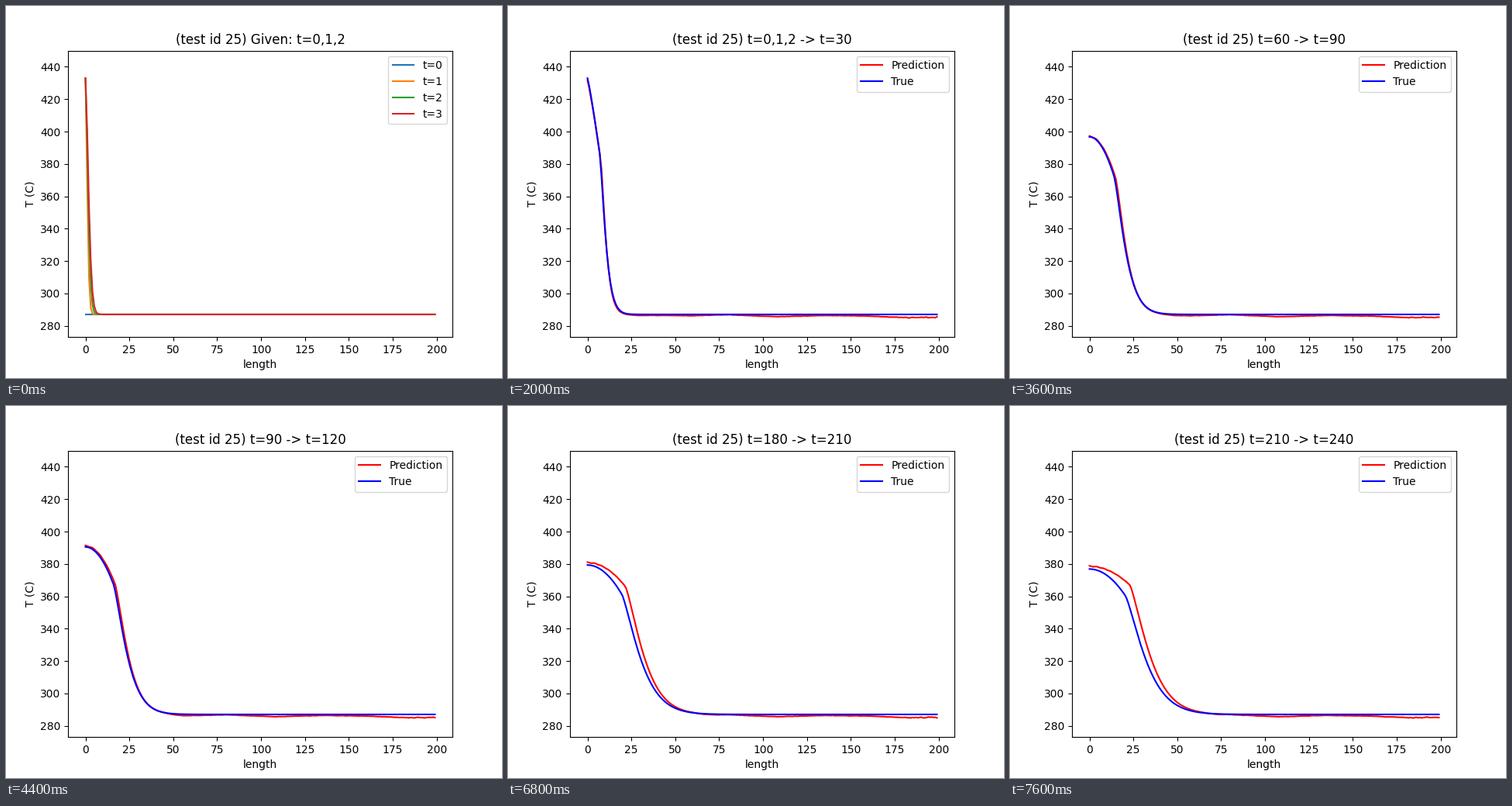
Recreate the animation shown at these times as a matplotlib script. Size 640 px wide and 480 px high, loop 8.4 s.

```python
import numpy as np
import matplotlib.pyplot as plt
from matplotlib.animation import FuncAnimation

AMBIENT = 287
HOT = 433             # surface temperature while the end is heated
TICK = 400            # ms per animation step
INTRO_STEPS = 5       # the opening chart stays 2000 ms
STEPS_PER_CHART = 2   # each comparison stays 800 ms
CHARTS = 8
X = np.arange(200)


def decay(x, width, power):
    return np.exp(-(np.maximum(x, 0) / width) ** power)


def early(t):
    """Short-time heating of the end of the bar."""
    if t == 0:
        return np.full(X.size, AMBIENT)
    return AMBIENT + (HOT - AMBIENT) * decay(X, 1.36 * np.sqrt(t), 1.6)


def shape(t):
    """Surface temperature, drop to the knee, knee position, tail width."""
    growth = np.log(t / 30)
    knee = 7 + 6.4 * growth
    width = 4.2 * np.exp(.59 * growth)
    if t <= 30:
        return HOT, 47, knee, width
    surface = AMBIENT + 119.2 * (t / 60) ** -.204
    return surface, 29.5 - .055 * t, knee, width


def profile(t, surface, drop, knee, width):
    bend = 1.15 if t <= 30 else 2
    plateau = surface - drop * (X / knee) ** bend
    tail = AMBIENT + (surface - drop - AMBIENT) * decay(X - knee, width, 1.3)
    return np.where(X < knee, plateau, tail)


def truth(t):
    return profile(t, *shape(t))


def prediction(t):
    """The true shape, lagging more and more, with drift and ripple."""
    surface, drop, knee, width = shape(t)
    lag = np.interp(t, [30, 150, 240], [.5, 1, 2.6])
    surface += 1.55 * np.log(t / 30) - 1.5
    drop -= 3 * (lag - 1)
    knee += lag
    width -= .4

    drift = np.interp(X, [45, 57, 80, 108, 135, 160, 182, 199],
                      [-.6, -.8, -.2, -1.4, -.6, -1, -2, -1.8])
    noise = np.random.default_rng(t).normal(0, 1, X.size)
    ripple = noise * np.where(X > 180, .14, .05)
    onset = np.clip((X - knee - 3 * width) / 10, 0, 1)
    wobble = .3 * np.cos(2 * np.pi * X / 4.1) * np.exp(-X / 9)
    return profile(t, surface, drop, knee, width) + onset * (drift + ripple) + wobble


fig, ax = plt.subplots(figsize=(6.4, 4.8), dpi=100)


def draw(step):
    ax.clear()
    if step < INTRO_STEPS:
        for t in range(4):
            ax.plot(X, early(t), label=f"t={t}")
        span = "Given: t=0,1,2"
    else:
        t = 30 * ((step - INTRO_STEPS) // STEPS_PER_CHART + 1)
        ax.plot(X, prediction(t), "r", label="Prediction")
        ax.plot(X, truth(t), "b", label="True")
        start = "0,1,2" if t == 30 else t - 30
        span = f"t={start} -> t={t}"
    ax.set_title(f"(test id 25) {span}")
    ax.set_xlabel("length")
    ax.set_ylabel("T (C)")
    ax.set_xlim(-9.95, 208.95)
    ax.set_ylim(273, 450)
    ax.legend(loc="upper right")
    return ax.get_children()


anim = FuncAnimation(fig, draw, frames=INTRO_STEPS + CHARTS * STEPS_PER_CHART,
                     init_func=lambda: [], interval=TICK, repeat=True,
                     repeat_delay=0, blit=False)
plt.show()
```
